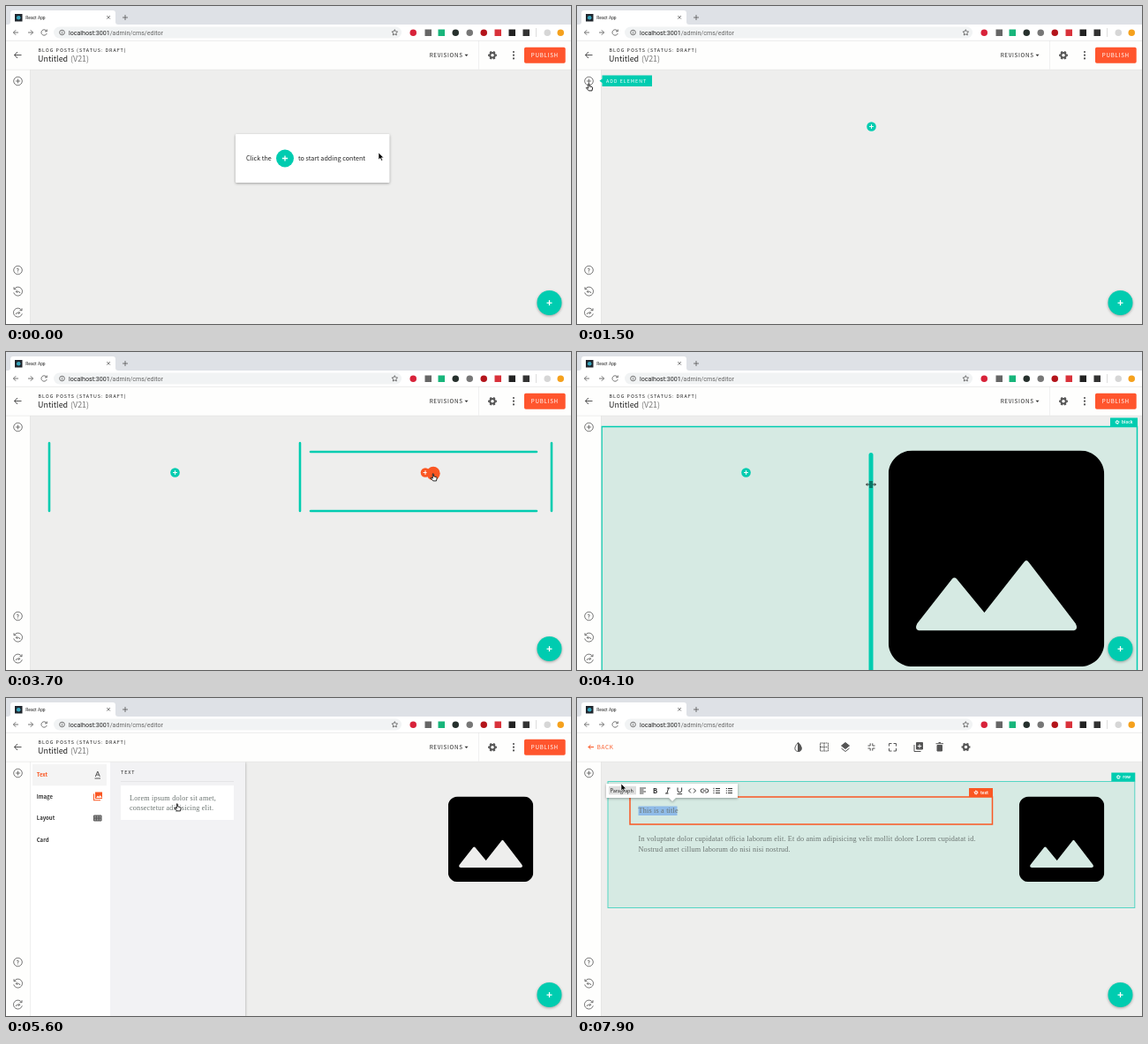
Write an HTML page that moves like this. It is 640 px wide and 360 px high and loops after 8 s.

```html
<!DOCTYPE html>
<html lang="en">
<head>
<meta charset="utf-8">
<title>Page editor</title>
<style>
html, body { margin: 0; width: 100%; height: 100%; overflow: hidden; background: #eeeeed; }
svg { display: block; width: 640px; height: 360px; }
text { font-family: "Noto Sans CJK JP", "Noto Sans CJK SC", Lato, sans-serif; fill: #222; white-space: pre; }
.ui { font-family: Roboto, sans-serif; }
.serif { font: 8.2px "Liberation Serif", serif; letter-spacing: .185px; fill: #6a7370; }
.caps { font-size: 5.37px; letter-spacing: .96px; }
.button { font-size: 6.27px; letter-spacing: .7px; }
.head { font-size: 8.95px; }
.body { font-size: 7.16px; }
.tag { font-size: 4.6px; font-weight: 700; fill: #fff; }
.tab { font-size: 6px; font-weight: 700; fill: #333; }
.white { fill: #fff; }
.line { fill: none; stroke: #555; stroke-width: 1; }
.thin { stroke-width: .8; }
.bar { stroke: #00ccb0; stroke-width: 2.6; stroke-linecap: round; }
.teal { fill: #00ccb0; }
.hot { fill: #fa5723; }
.soft { filter: drop-shadow(0 1px 1.5px #0005); }
</style>
</head>
<body>
<svg viewBox="0 0 640 360">
  <defs>
    <symbol id="picture" viewBox="3 3 18 18"><path d="M21 19V5c0-1.1-.9-2-2-2H5c-1.1 0-2 .9-2 2v14c0 1.1.9 2 2 2h14c1.1 0 2-.9 2-2zM8.3 13.7q.2-.2.4 0L11 16.5l3.3-4.2q.2-.3.4 0l3.9 5.1q.3.6-.3.6H5.7q-.6 0-.3-.6z"/></symbol>
    <g id="gear" fill="none" stroke="currentColor"><circle r="2.8" stroke-width="2"/><circle r="4.1" stroke-width="1.7" pathLength="12" stroke-dasharray="1 1" stroke-dashoffset=".5"/></g>
    <g id="plus"><circle r="5.3"/><path d="M-2.4 0h4.8M0-2.4v4.8" stroke="#fff"/></g>
    <g id="turn"><path d="M-4.200-2.600A5 5 0 1 1-4.800 1.400M-4.500-4.800v2.500h2.500"/><path d="M-2 .3h3q1.200.2 1.200 1.700M-.700-1.200L-2.200.3l1.500 1.500"/></g>
  </defs>

  <rect width="640" height="360" fill="#eeeeed"/>

  <g id="stage">
    <g data-on="0-600">
      <rect class="soft" x="260" y="145" width="174.5" height="55" rx="1" fill="#fff"/>
      <circle class="teal" cx="316" cy="172.5" r="10"/>
      <use href="#plus" class="teal" transform="translate(316 172.5) scale(1.3)"/>
      <text class="body" x="272" y="175">Click the</text>
      <text class="body" x="331" y="175">to start adding content</text>
    </g>
    <g id="frames"></g>
    <g class="bar">
      <path data-on="1800-2150" d="M49 103v77M618 103v77M61 113h540M61 180h540"/>
      <path data-on="3550-3850" d="M49 103v77M333 103v77M618 103v77M345 113h256M345 180h256"/>
      <path data-on="6050-6400" d="M49 115v102M618 115v102M61 113h408M61 217h408"/>
      <path id="split" data-on="4050-4500,6050-6700" stroke-width="5"/>
    </g>
    <use href="#plus" class="teal" x="333.5" y="136.5" data-on="600-2150"/>
    <use href="#plus" class="teal" id="left" y="136.5" data-on="2150-6400"/>
    <use href="#plus" class="teal" x="475" y="136.5" data-on="2450-3620"/>
    <use href="#plus" class="hot" x="475" y="136.5" data-on="3620-3850"/>
    <use href="#picture" id="photo" y="111.6" data-on="3850-8000"/>
    <g data-on="6400-7100">
      <text class="serif" x="69.5" y="130.3">Cillum laborum aute excepteur nostrud Lorem quis do velit ea non velit eu velit. Ut incididunt aliqua ipsum elit</text>
      <text class="serif" x="69.5" y="142.3">labore esse consequat nulla. Nulla veniam nostrud consectetur dolor cupidatat esse.</text>
    </g>
    <g data-on="7100-8000">
      <rect id="mark" y="122.5" height="10.5" fill="#8fbbe8"/>
      <text class="serif" id="title" x="69.5" y="130.3"></text>
      <text class="serif" x="69.5" y="162.3">In voluptate dolor cupidatat officia laborum elit. Et do anim adipisicing velit mollit dolore Lorem cupidatat id.</text>
      <text class="serif" x="69.5" y="174.3">Nostrud amet cillum laborum do nisi nisi nostrud.</text>
    </g>
  </g>

  <g class="soft teal">
    <circle cx="615.5" cy="336" r="14"/>
    <use href="#plus" transform="translate(615.5 336) scale(1.25)"/>
  </g>

  <g id="panel" data-on="1600-1800,3300-3550,4700-6050">
    <rect class="soft" x="118" y="72" width="153" height="288" fill="#f2f2f4"/>
    <rect x="27" y="72" width="91" height="288" fill="#fff"/>
    <path d="M130 94.5h128" stroke="#e4e4e6"/>
    <rect x="130" y="99" width="128" height="39" fill="#fff"/>
    <g id="tabs"></g>
    <g class="line">
      <path d="M100.5 91h6.5M101.300 89l2.500-6 2.500 6M102.200 87h3.200"/>
      <path d="M99.5 133h8.5v6h-8.5zM99.5 136h8.5M102.300 133v6M105.200 133v6" fill="#999"/>
    </g>
    <path class="hot" d="M101 106.5h8v7.500h-8zM99 108.500h1v6.800h7v1h-8z"/>
    <path d="M102 113l2-2.500 1.200 1.400 1.500-2 2 3.100z" fill="#fff"/>
  </g>

  <g id="rail">
    <path d="M27 72v288" stroke="#e0e0df"/>
    <rect y="72" width="27" height="288" fill="#fefefd"/>
    <circle cx="13.5" cy="85.5" r="13" fill="#ddd" data-on="3180-3400,4600-5150,7030-7100"/>
    <g class="line thin">
      <circle cx="13.5" cy="85" r="4.800"/><path d="M11 85h5M13.5 82.500v5"/>
      <circle cx="13.5" cy="299" r="4.800"/>
      <use href="#turn" x="13.5" y="323"/>
      <use href="#turn" transform="translate(13.5 347) scale(-1 1)"/>
    </g>
    <text x="11.800" y="301.500" font-size="6.500">?</text>
    <g data-on="1280-1600,3080-3300,4600-4690">
      <path class="teal" d="M28.5 78.500H85v12.500H28.500v-4l-3-2.200 3-2.200z"/>
      <text class="caps white" x="33" y="86.800">ADD ELEMENT</text>
    </g>
  </g>

  <g id="header">
    <rect y="39" width="640" height="33" fill="#fefefd"/>
    <path d="M0 72.200h640" stroke="#e2e2e1" stroke-width=".6"/>
    <g data-on="0-600,1100-7200">
      <path class="line" d="M17.500 55.500h-8M13 52l-3.700 3.500L13 59"/>
      <text class="caps" x="36.600" y="51.800">BLOG POSTS (STATUS: DRAFT)</text>
      <text class="head" x="36" y="63.200">Untitled</text>
      <text class="head" x="73" y="63" style="fill:#777">(V21)</text>
      <text class="button" x="479.700" y="58">REVISIONS</text>
      <path d="M519.500 54.800h4l-2 2.200z" fill="#333"/>
      <path d="M535.500 39v33" stroke="#f0f0f0"/>
      <use href="#gear" x="551" y="55.700" color="#555"/>
      <path d="M575 52v.01M575 55.700v.01M575 59.400v.01" stroke="#555" stroke-width="2.200" stroke-linecap="round"/>
      <rect x="587" y="46.800" width="46.700" height="18" rx="1.800" fill="#ff552d"/>
      <text class="button white" x="594.800" y="58">PUBLISH</text>
    </g>
    <g data-on="600-1100,7200-8000">
      <rect y="46" width="48" height="19" rx="2" fill="#feeee9" data-on="930-1100"/>
      <path class="line" d="M19 55.500h-6M15.500 53L13 55.500l2.500 2.500" style="stroke:#fa5723"/>
      <text class="button" x="22.800" y="58" style="fill:#fa5723">BACK</text>
      <g class="line">
        <path d="M250.500 50.500c-6 6-3.500 10 0 10s6-4 0-10z"/><path d="M250.500 50.500c6 6 3.500 10 0 10z" fill="#555"/>
        <path d="M275.500 51h9v9h-9zM280 51v9M275.500 55.500h9" stroke-dasharray="1.500 .6"/>
        <path d="M304 50.500l4.500 3.500-4.500 3.500-4.500-3.500z" fill="#555"/><path d="M299.500 57l4.500 3.500 4.500-3.500"/>
        <path d="M329.500 54h2.700v-2.700M337.500 54h-2.700v-2.700M329.500 57h2.700v2.700M337.500 57h-2.700v2.700"/>
        <path d="M353.500 54.500v-3h3M358.500 51.500h3v3M361.500 57v3h-3M356.500 60h-3v-3"/>
        <path d="M382 53v7.500h7.500"/><path d="M384.500 50.500h7v7.500h-7z" fill="#555"/><path d="M388 52.300v4.400M385.800 54.500h4.400" style="stroke:#fff"/>
        <path d="M408 53.500h5.500v6.500H408z" fill="#555"/><path d="M406.500 51.700h8.500M409.500 50.500h2.500"/>
      </g>
      <use href="#gear" x="440.500" y="55.500" color="#555"/>
    </g>
  </g>

  <g id="browser">
    <rect width="640" height="21" fill="#dee1e6"/>
    <rect y="21" width="640" height="18" fill="#fff"/>
    <path d="M0 39.300h640" stroke="#e3e3e3" stroke-width=".7"/>
    <path d="M2 21q3 0 3-3V8q0-3 3-3h113q3 0 3 3v10q0 3 3 3z" fill="#fff"/>
    <rect x="10" y="9" width="8.500" height="8.500" fill="#20262d"/>
    <circle cx="14.250" cy="13.250" r="2.300" fill="#38a5bd"/>
    <text class="ui" x="22.300" y="15" font-size="4.900">React App</text>
    <g class="line thin">
      <path d="M114.300 11l3.600 3.600M117.900 11l-3.600 3.600M132 13h6M135 10v6"/>
      <path d="M14 30H8.500M11.200 27.200L8.400 30l2.800 2.800"/>
      <path d="M25 30h5.500M27.800 27.200l2.800 2.800-2.800 2.800"/>
      <path d="M46 28.500a3.200 3.200 0 1 0 .2 2.500M46.300 26.500v2.300H44"/>
    </g>
    <rect x="54" y="23.500" width="394" height="13" rx="6.500" fill="#f1f3f4"/>
    <g class="line thin"><circle cx="63.500" cy="30" r="2.800"/><path d="M63.500 29.500v2M63.500 28v.6"/>
      <path d="M440.300 26.700l1 2.100 2.300.3-1.700 1.600.4 2.300-2-1.100-2 1.100.4-2.300-1.700-1.600 2.300-.3z"/></g>
    <text class="ui" x="71" y="32.500" font-size="7.100">localhost:3001<tspan fill="#666">/admin/cms/editor</tspan></text>
    <g id="addons"></g>
    <path d="M600.500 25v10" stroke="#ddd"/>
  </g>

  <g data-on="7800-8000">
    <path class="soft" d="M33 97h149v16h-70l-4 4-4-4H33z" fill="#fff"/>
    <rect x="36" y="99.800" width="31" height="9.500" fill="#dedede"/>
    <text x="37.500" y="106.700" font-size="5.500">Paragraph</text>
    <g class="line" style="stroke:#333">
      <path d="M71 102h7M71 104h4.500M71 106h7M71 108h4.500" stroke-width=".9"/>
      <path d="M102 102h3.500M100 108h3.500M103.700 102l-1.900 6"/>
      <path d="M114 101.500v3.300q0 2 2.300 2t2.300-2v-3.300M113.500 108.700h5.600"/>
      <path d="M129 102.500l-2.500 2.500 2.500 2.500M132 102.500l2.500 2.500-2.500 2.500"/>
      <path d="M143.700 103h-1.500a2 2 0 0 0 0 4h1.500M145.300 103h1.500a2 2 0 0 1 0 4h-1.500M142.700 105h3.600"/>
      <path d="M157 102.500h5M157 105h5M157 107.500h5M155 101.800v1.400M155 104.300v1.400M155 106.800v1.400"/>
      <path d="M171 102.500h5M171 105h5M171 107.500h5M168.800 102.500h1.200M168.800 105h1.200M168.800 107.500h1.200"/>
    </g>
    <text x="86" y="107.800" font-size="7.500" font-weight="700">B</text>
  </g>

  <g id="pointer">
    <circle class="hot" r="7.700" cy="-.5" data-on="1830-2150,3570-3850,6070-6400"/>
    <path data-on="0-400,620-930,1120-1270,2150-3080,3850-4050,4500-4600,6400-6520,6900-7030,7720-8000" d="M0 0v8l1.900-1.700 1.300 2.900 1.400-.6-1.300-2.800h2.500z" stroke="#fff" stroke-width=".6"/>
    <path data-on="400-620,930-1120,1270-2150,3080-3850,4600-6400,7030-7100" d="M-.7 0q.9-.8 1.300.2v2.700l2.900.7q.8.300.6 1.300l-.6 3H-.2L-3 4.900q-.1-1 1-.6l1.300.9z" fill="#fff" stroke="#111" stroke-width=".9"/>
    <path data-on="6520-6900,7100-7720" d="M-1.700-3.500q1.700 0 1.700 1Q0-3.500 1.700-3.500M0-2.700v5.400M-1.700 3.500q1.700 0 1.700-1Q0 3.500 1.700 3.500" fill="none" stroke="#222" stroke-width=".8"/>
    <path data-on="4050-4500" d="M-1 -4v8M1-4v8M-2 0h-3M2 0h3M-4-1.500L-5.500 0-4 1.500M4-1.500L5.500 0 4 1.500" fill="none" stroke="#111" stroke-width=".9"/>
  </g>
</svg>
<script>
const LOOP = 8000, TEAL = '#00ccb0', PALE = '#55d5c4', HOT = '#fa5723', TINT = '#d6eae3';
const $ = id => document.getElementById(id);

// Outlined element with its name tag at the top right
const frame = (on, name, x, y, x2, y2, color = TEAL, fill = TINT, width = 1) => {
  const tag = name === 'block' ? 31 : 27;
  return `<g data-on="${on}">
    <rect x="${x}" y="${y}" width="${x2 - x}" height="${y2 - y}" fill="${fill}" stroke="${color}" stroke-width="${width}"/>
    <path d="M${x2 + .5} ${y}v-10h${-tag}v10z" fill="${color === PALE ? TEAL : color}"/>
    <use href="#gear" color="#fff" transform="translate(${x2 - tag + 8.5} ${y - 5}) scale(.5)"/>
    <text class="tag" x="${x2 - tag + 13.5}" y="${y - 3.3}">${name}</text></g>`;
};

$('frames').innerHTML =
  frame('600-1100', 'block', 28, 84.5, 634.5, 198, HOT, 'none', 1.5) +
  frame('2250-2650', 'row', 35, 94.5, 631.8, 188.5, PALE) +
  frame('3900-5150', 'block', 28, 84.5, 634.5, 247, TEAL, TINT, 1.5) +
  frame('6450-6850', 'text', 60, 112, 470.5, 155.5, PALE) +
  frame('7800-8000', 'row', 35, 94.5, 631.8, 237.5, PALE) +
  frame('7200-8000', 'text', 60, 112, 470.5, 143, HOT, 'none', 1.5);
const block = $('frames').children[2].querySelector('rect');

const tabs = [
  ['Text', 89.3, '1600-1700,5250-6050', '<text class="serif" x="140" y="116">Lorem ipsum dolor sit amet,</text><text class="serif" x="140" y="127">consectetur adipisicing elit.</text>'],
  ['Image', 113.8, '3400-3550,4700-5250', '<use href="#picture" x="182" y="106" width="25" height="25"/>'],
  ['Layout', 138.2, '1700-1800,3300-3400', '<path class="line" d="M182 110h25v17h-25zM194.5 110v17"/>'],
  ['Card', 162.6, '', '']
];
$('tabs').innerHTML = tabs.map(([name, y, on, art]) => `
  <text class="tab" x="34.7" y="${y}">${name}</text>
  ${on && `<g data-on="${on}"><rect x="30" y="${y - 14.5}" width="84" height="24.5" fill="#f4f4f4"/>
  <text class="tab" x="34.7" y="${y}" style="fill:${HOT}">${name}</text>
  <text class="caps" x="130" y="86.3">${name.toUpperCase()}</text>${art}</g>`}`).join('');

// Browser buttons: x, colour, round
$('addons').innerHTML = [
  [461, '#d8233a', 1], [478, '#666', 0], [493, '#18b57b', 0], [509, '#26302d', 1],
  [525, '#777', 1], [541, '#b3141b', 1], [557, '#d9323b', 0], [573, '#222', 0],
  [589, '#333', 0], [613, '#d6d6d6', 1], [628, '#f5a11d', 1]
].map(([x, color, round]) => `<rect x="${x - 3.5}" y="26.5" width="7.5" height="7.5" rx="${round * 4}" fill="${color}"/>`).join('');

const timed = [...document.querySelectorAll('[data-on]')].map(el =>
  [el, el.dataset.on.split(',').map(span => span.split('-').map(Number))]);

// Pointer stops: time, x, y
const stops = [
  [0, 422, 166], [100, 422, 166], [450, 317, 173], [620, 317, 173], [950, 30, 57], [1120, 30, 57],
  [1320, 13.5, 88], [1600, 13.5, 88], [1690, 50, 136], [1790, 194, 120], [2050, 333, 138], [2150, 333, 138],
  [2380, 561, 153], [2450, 561, 153], [2700, 206, 270], [3100, 13.5, 87], [3310, 13.5, 87], [3400, 45, 112],
  [3520, 194, 119], [3680, 484, 138], [3850, 484, 138], [4080, 333, 150], [4150, 333, 150], [4430, 481, 150],
  [4480, 481, 150], [4650, 12.5, 84], [5100, 12.5, 84], [5230, 44, 88], [5320, 44, 88], [5600, 194, 120],
  [6000, 194, 120], [6330, 191, 138], [6420, 191, 138], [6580, 203, 162.5], [6850, 203, 162.5], [7050, 13, 85],
  [7100, 13, 85], [7190, 92, 128], [7500, 114, 128], [7560, 114, 128], [7690, 69.5, 128], [7800, 50, 97], [8000, 50, 97]
];
const ease = p => p * p * (3 - 2 * p);
const ramp = (t, a, b) => Math.min(1, Math.max(0, (t - a) / (b - a)));
const set = (el, attrs) => { for (const k in attrs) el.setAttribute(k, attrs[k]); };

function draw(t) {
  for (const [el, spans] of timed)
    el.style.display = spans.some(([a, b]) => t >= a && t < b) ? '' : 'none';

  const i = stops.findIndex(s => s[0] > t), a = stops[i - 1], b = stops[i];
  const p = ease(ramp(t, a[0], b[0]));
  set($('pointer'), { transform: `translate(${a[1] + (b[1] - a[1]) * p} ${a[2] + (b[2] - a[2]) * p})` });

  // Column divider; the picture fills the right column
  const split = 333 + 148 * ease(ramp(t, 4150, 4430)), size = 577.5 - split;
  set($('photo'), { x: split + 19.8, width: size, height: size });
  set($('left'), { x: (split + 50) / 2 });
  set($('split'), { d: `M${split} 116.5V${size + 118.5}` });
  set(block, { height: size + 66 });

  const title = 'This is a title';
  $('title').textContent = title.slice(0, Math.round(title.length * ramp(t, 7230, 7500)));
  const picked = 44 * ease(ramp(t, 7560, 7690));
  set($('mark'), { x: 113.5 - picked, width: picked });
}

let start;
function tick(now) {
  start ??= now;
  draw((now - start) % LOOP);
  requestAnimationFrame(tick);
}
draw(0);
requestAnimationFrame(tick);
</script>
</body>
</html>
```
